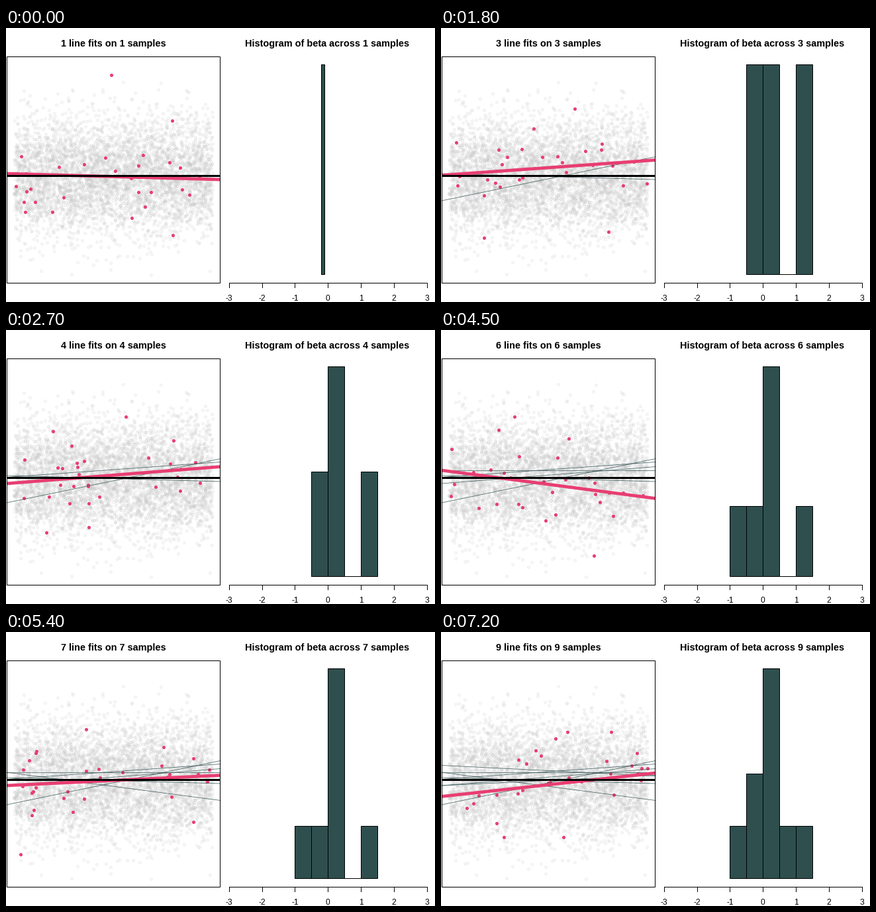
A matplotlib script for the animation above (8000 ms loop, 648x414 px).

```python
import numpy as np
import matplotlib.pyplot as plt
from matplotlib.animation import FuncAnimation
from matplotlib.patches import Rectangle

W, H = 648, 414
LEFT, RIGHT, TOP, BOTTOM = 1, 323, 43, 385   # scatter panel
MEAN_Y = 223
BAR_TOP, BAR_BASE = 55, 372
PINK, SLATE = "#E83E72", "darkslategrey"
PX_PER_BETA = 64       # rise of a fitted line across the panel for beta = 1
SAMPLE_SIZE = 30
STEP_MS, HOLD = 100, 9
FRAMES = 80

# Per sample: height of the fit at both panel edges, highest and lowest dot
FITS = [
    (219.5, 228.5, (158, 70), (251, 312)),
    (260.5, 194, (271, 132), (207, 314)),
    (222, 199, (201, 121), (64, 316)),
    (231.5, 206, (180, 130), (60, 305)),
    (212.2, 212, (65, 131), (30, 299)),
    (211.5, 254, (110, 130), (230, 340)),
    (231.5, 216, (120, 146), (21, 335)),
    (201, 217, (215, 125), (90, 310)),
    (248, 212.5, (190, 150), (184, 309)),
]
betas = np.array([(y0 - y1) / PX_PER_BETA for y0, y1, *_ in FITS])

plt.rcParams["font.family"] = "Liberation Sans"
rng = np.random.default_rng(11)

fig = plt.figure(figsize=(W / 72, H / 72), dpi=72, facecolor="white")
ax = fig.add_axes([0, 0, 1, 1])
ax.set_xlim(0, W)
ax.set_ylim(H, 0)
ax.axis("off")


def draw_sample(y0, y1, highest, lowest):
    """Scatter dots around a fitted line, between its two extreme dots."""
    x = rng.uniform(12, 312, SAMPLE_SIZE - 2)
    line = np.interp(x, [LEFT, RIGHT], [y0, y1])
    y = np.clip(line + rng.normal(0, 32, x.size), highest[1], lowest[1])
    return np.vstack([np.column_stack([x, y]), highest, lowest]).round() + 0.5


def hist_x(beta):
    return 486.3 + 49.85 * beta


# Population cloud
cloud_x = rng.uniform(12, 312, 5000)
cloud_y = np.clip(rng.normal(MEAN_Y, 44, 5000), TOP + 12, BOTTOM - 12)
ax.plot(cloud_x, cloud_y, "o", ms=4, mew=1, mfc=(0.78, 0.78, 0.78, 0.12),
        mec=(0.78, 0.78, 0.78, 0.2), zorder=1)

# Static parts: panel frame, true line, histogram axis
ax.add_patch(Rectangle((LEFT, TOP), RIGHT - LEFT, BOTTOM - TOP, fill=False,
                       ec="black", lw=1, zorder=6))
ax.plot([LEFT, RIGHT], [MEAN_Y] * 2, color="black", lw=3,
        solid_capstyle="butt", zorder=5)
ax.plot([hist_x(-3), hist_x(3)], [BOTTOM] * 2, color="black", lw=1)
for tick in range(-3, 4):
    ax.plot([hist_x(tick)] * 2, [BOTTOM, BOTTOM + 7], color="black", lw=1)
    ax.text(hist_x(tick), 412, str(tick), size=12, ha="center", va="baseline")

# Parts that change with every new sample
samples = [draw_sample(*fit) for fit in FITS]
thin_lines = [ax.plot([LEFT, RIGHT + 1], [y0 + 0.5, y1 + 0.5], color=SLATE,
                      lw=0.8, alpha=0.85, zorder=3)[0]
              for y0, y1, *_ in FITS]
dots = ax.scatter([], [], s=26, color=PINK, linewidths=0,
                  antialiaseds=False, zorder=2)
fit_line, = ax.plot([], [], color=PINK, lw=4.8, solid_capstyle="butt",
                    zorder=4)
bars = [ax.add_patch(Rectangle((0, 0), 0, 0, fc=SLATE, ec="black", lw=1))
        for _ in range(5)]
title_style = dict(size=14.55, weight="bold", ha="center", va="baseline")
fit_title = ax.text(162, 28, "", **title_style)
hist_title = ax.text(485.3, 28, "", **title_style)


def draw_histogram(n):
    seen = betas[:n]
    step = {1: 0.1, 2: 1.0}.get(n, 0.5)
    lo, hi = np.floor(seen.min() / step), np.ceil(seen.max() / step)
    edges = np.arange(lo, hi + 1) * step
    counts, _ = np.histogram(seen, edges)
    for i, bar in enumerate(bars):
        bar.set_visible(i < len(counts))
        if i < len(counts):
            x0, x1 = hist_x(edges[i]), hist_x(edges[i + 1])
            height = (BAR_BASE - BAR_TOP) * counts[i] / counts.max()
            bar.set_bounds(x0, BAR_BASE - height, x1 - x0, height)


def update(frame):
    n = min(frame // HOLD + 1, len(FITS))
    y0, y1, *_ = FITS[n - 1]
    for i, line in enumerate(thin_lines):
        line.set_visible(i < n - 1)
    dots.set_offsets(samples[n - 1])
    fit_line.set_data([LEFT, RIGHT + 1], [y0 + 0.5, y1 + 0.5])
    fit_title.set_text(f"{n} line fits on {n} samples")
    hist_title.set_text(f"Histogram of beta across {n} samples")
    draw_histogram(n)
    return [dots, fit_line, fit_title, hist_title, *thin_lines, *bars]


anim = FuncAnimation(fig, update, frames=FRAMES, interval=STEP_MS,
                     repeat=True, repeat_delay=0, blit=False)
plt.show()
```
